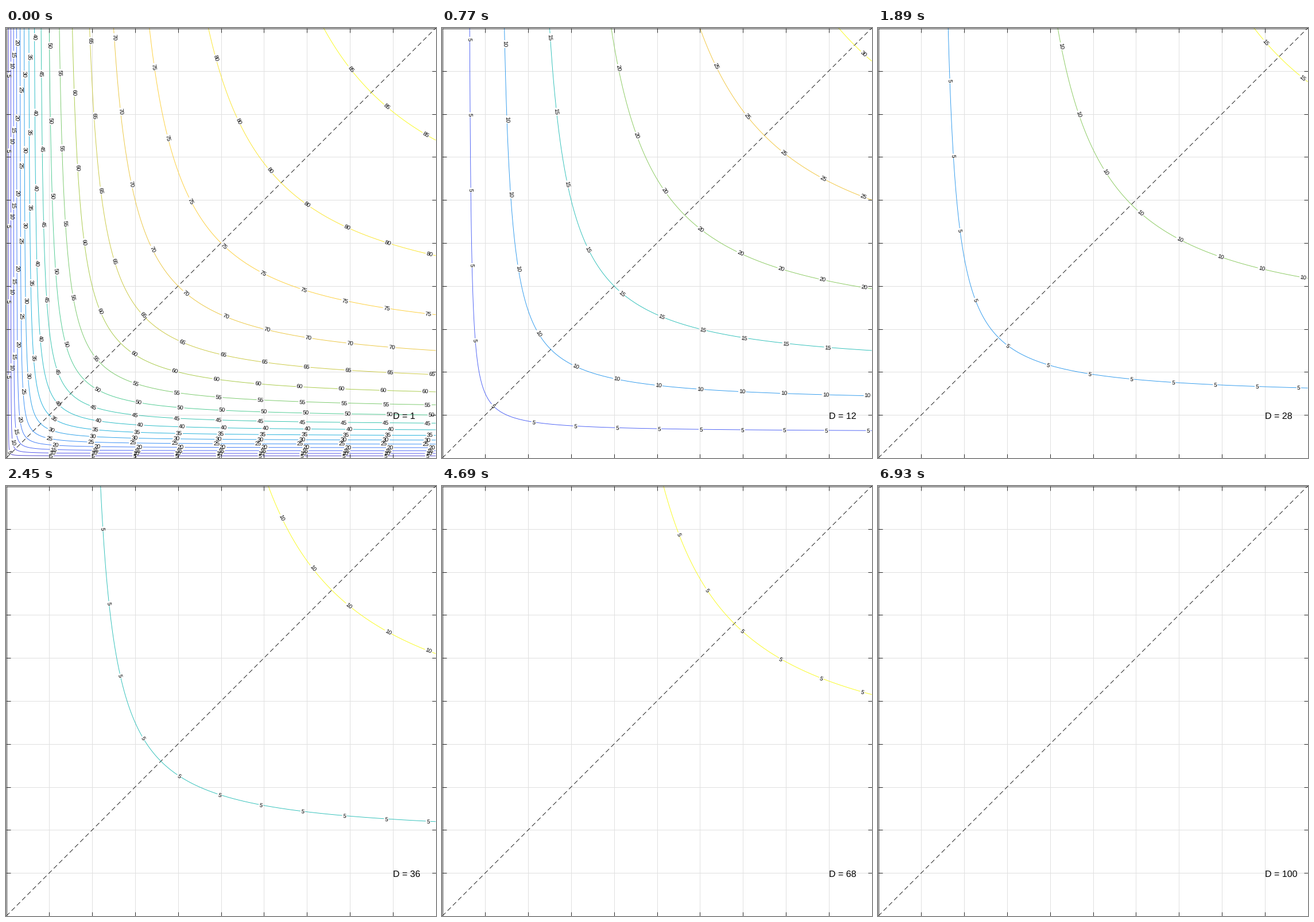
Animation of 749 by 748 pixels, one loop 7 s. Source, as a matplotlib script:

```python
import numpy as np
import matplotlib.pyplot as plt
from matplotlib.animation import FuncAnimation
from matplotlib.collections import LineCollection
from matplotlib.colors import LinearSegmentedColormap

W, H = 749, 748
DPI = 100
PX = 72 / DPI              # one pixel in points
FRAMES, INTERVAL = 100, 70
STEP = 5                   # spacing of contour levels
SPAN = 748                 # side of the square plot
GAP_X, GAP_Y = 72.85, 131.2  # label spacing along each axis, pixels
DIGIT = 5.56               # digit width of a 10 px label

CMAP = LinearSegmentedColormap.from_list("blue_to_yellow", [
    "#3e26a8", "#4852f4", "#2e87f7", "#12b1d6",
    "#37c897", "#abc739", "#fec338", "#f9fb15"])

plt.rcParams["font.family"] = "Liberation Sans"
plt.rcParams["text.hinting"] = "none"
fig = plt.figure(figsize=(W / DPI, H / DPI), dpi=DPI, facecolor="white")
ax = fig.add_axes([0, 0, 1, 1])
ax.set_xlim(0, W)
ax.set_ylim(H, 0)
ax.axis("off")


def to_px(x, y):
    """Map unit-square data to pixel positions."""
    return 0.5 + SPAN * x, H - SPAN * y


def line(x0, y0, x1, y1, color, z):
    ax.plot([x0, x1], [y0, y1], color=color, lw=PX, zorder=z,
            solid_capstyle="butt")


def draw_frame():
    ink, grid, tick = "#262626", "#e0e0e0", 7.5
    for k in range(1, 10):
        x, y = to_px(k / 10, k / 10)
        line(x, 0, x, H, grid, 1)
        line(0, y, W, y, grid, 1)
        for a, b in ((0, tick), (H - tick, H)):
            line(x, a, x, b, ink, 5)
        for a, b in ((0, tick), (W - tick, W)):
            line(a, y, b, y, ink, 5)
    for x in (0.5, W - 0.5):
        line(x, 0, x, H, ink, 5)
    for y in (0.5, H - 0.5):
        line(0, y, W, y, ink, 5)
    (x0, y0), (x1, y1) = to_px(0, 0), to_px(1, 1)
    ax.plot([x0, x1], [y0, y1], color="black", lw=0.85 * PX, zorder=3,
            dashes=(8 / 0.85, 5 / 0.85), dash_capstyle="butt")


def contour(p):
    """Curve x*y/(x+y) = p inside the unit square, from top to right."""
    end = np.log(1 / p - 1)
    w = np.linspace(-end, end, 1200)
    return to_px(p * (1 + np.exp(w)), p * (1 + np.exp(-w)))


def arc(x, y, ux=1.0, uy=1.0):
    steps = np.hypot(np.diff(x) / ux, np.diff(y) / uy)
    return np.concatenate([[0], np.cumsum(steps)])


def label_spots(x, y, s, half):
    """Arc positions of the labels, one unit apart in stretched length."""
    t = arc(x, y, GAP_X, GAP_Y)
    total = t[-1]
    n = max(int(np.floor(total - 0.135)), 0)
    first = max(0.81 * (total - n) - 0.04, 0.122)
    marks = first + np.arange(n + 1)
    spots = np.interp(marks[marks < total], t, s)
    return [c for c in spots if s[-1] - c > half]


def pieces(x, y, s, spots, half):
    """Split the curve around each label."""
    cuts = [0.0]
    for c in spots:
        cuts += [c - half, c + half]
    cuts.append(s[-1])
    out = []
    for a, b in zip(cuts[::2], cuts[1::2]):
        if b > a:
            q = np.concatenate([[a], s[(s > a) & (s < b)], [b]])
            out.append(np.column_stack([np.interp(q, s, x),
                                        np.interp(q, s, y)]))
    return out


draw_frame()
title = ax.text(673.7, 674, "", fontsize=16 * PX, zorder=7,
                va="center_baseline", rotation_mode="anchor")
live = []


def add_level(level, p, color):
    x, y = contour(p)
    s = arc(x, y)
    text = str(level)
    half = len(text) * DIGIT / 2
    spots = label_spots(x, y, s, half)
    lines = LineCollection(pieces(x, y, s, spots, half + 1.2),
                           colors=[color], linewidths=0.9 * PX, zorder=4)
    live.append(ax.add_collection(lines, autolim=False))
    for c in spots:
        cx, left, right = np.interp([c, c - 4, c + 4], s, x)
        cy, upper, lower = np.interp([c, c - 4, c + 4], s, y)
        angle = -np.degrees(np.arctan2(lower - upper, right - left))
        live.append(ax.text(cx, cy, text, fontsize=10 * PX, zorder=6,
                            rotation=angle, rotation_mode="anchor",
                            ha="center", va="center_baseline"))


def update(i):
    while live:
        live.pop().remove()
    d = i + 1
    title.set_text(f"D = {d}")
    levels = [(v, d * v / (10 * (105 - v))) for v in range(STEP, 100, STEP)]
    levels = [(v, p) for v, p in levels if p < 0.4999]
    for v, p in levels:
        add_level(v, p, CMAP(v / levels[-1][0]))
    return live


anim = FuncAnimation(fig, update, frames=FRAMES, init_func=lambda: [],
                     interval=INTERVAL, repeat=True, repeat_delay=0,
                     blit=False)
plt.show()
```
